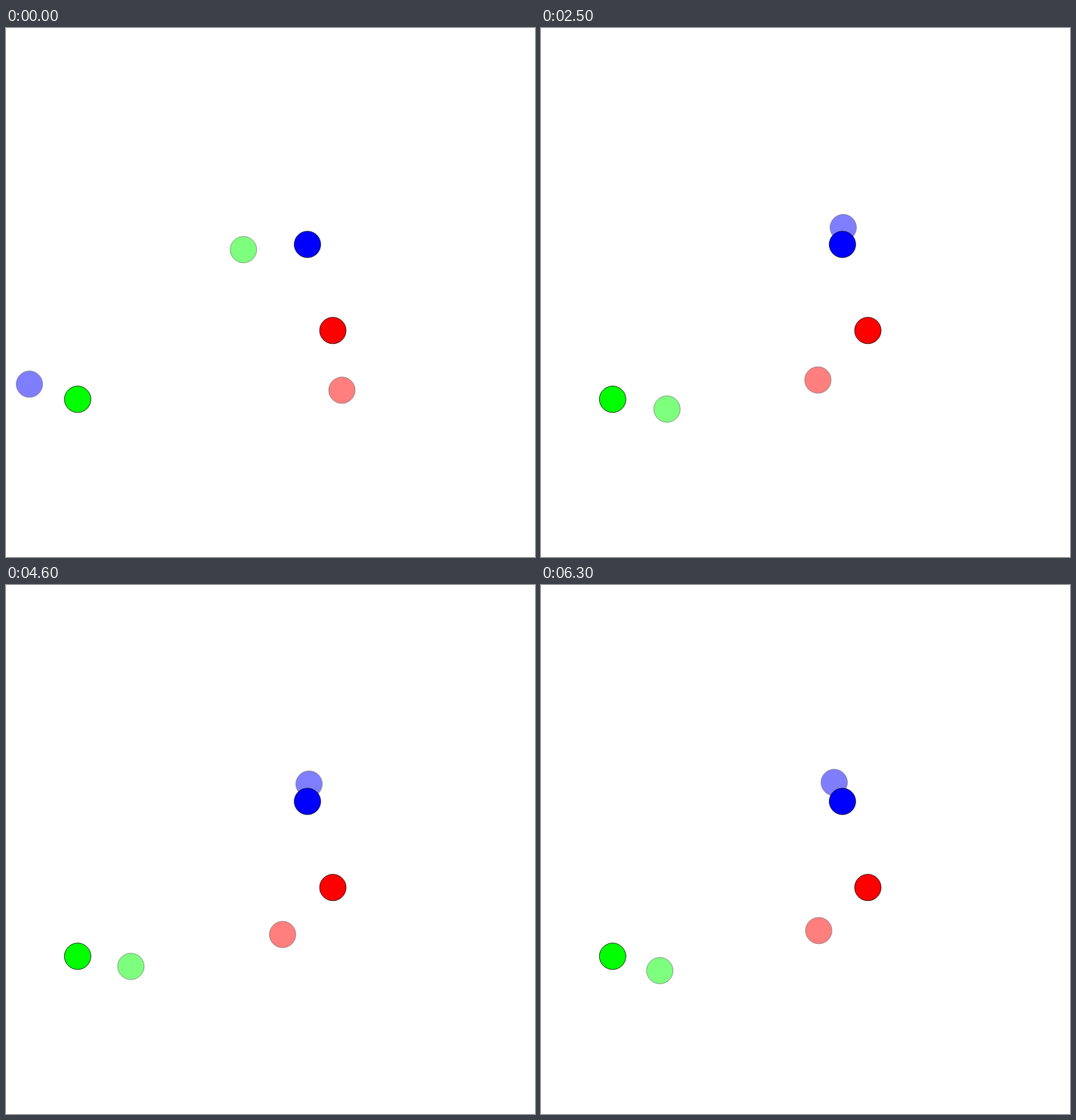
Write an HTML page that moves like this. It is 700 by 700 pixels and loops after 6.4 s.

```html
<!DOCTYPE html>
<html lang="en">
<head>
<meta charset="utf-8">
<title>Converging estimates</title>
<style>
  html, body { margin: 0; width: 100%; height: 100%; overflow: hidden; background: #fff; }
  svg { display: block; width: 100vw; height: 100vh; }
  circle { stroke: #000; stroke-opacity: .7; stroke-width: 1; }
  .estimate { opacity: .5; }
</style>
</head>
<body>
<svg viewBox="0 0 700 700"></svg>
<script>
const STEP = 100, STEPS = 64, RADIUS = 17.5;
const svg = document.querySelector("svg");

// Decaying offset whose size sways between 1 and 1 - 2 * sway of its envelope.
const settle = (start, decay, sway, speed) => step =>
  start * Math.exp(-decay * step) * (1 - sway + sway * Math.cos(speed * step));

// Each estimate settles into a triangle of three poses, visited in turn.
const points = [
  { color: "#f00", fixed: [432.5, 400.3],
    poses: [[367.5, 457.3], [366, 462.5], [382.5, 448.7]],
    dx: settle(77, .24, -1.15, .19), dy: settle(22, .24, -29.8, .12) },
  { color: "#0f0", fixed: [94.8, 491.3],
    poses: [[157.2, 510.3], [165.3, 504.7], [169, 520.1]],
    dx: settle(157, .24, -2.7, .19), dy: settle(-217, .24, 1, .225) },
  { color: "#00f", fixed: [398.9, 286.4],
    poses: [[388, 261.3], [401, 263.4], [392.7, 254.5]],
    dx: settle(-357, .24, -.22, .19), dy: settle(210, .2, .35, .42) }
];

function addCircle(color, [x, y], className) {
  const circle = document.createElementNS("http://www.w3.org/2000/svg", "circle");
  const attributes = { fill: color, r: RADIUS, cx: x, cy: y, class: className };
  for (const name in attributes) circle.setAttribute(name, attributes[name]);
  return svg.appendChild(circle);
}

for (const p of points) p.estimate = addCircle(p.color, p.poses[0], "estimate");
for (const p of points) addCircle(p.color, p.fixed, "fixed");

function draw() {
  const step = Math.floor(performance.now() / STEP) % STEPS;
  for (const p of points) {
    const [x, y] = p.poses[step % p.poses.length];
    p.estimate.setAttribute("cx", x + p.dx(step));
    p.estimate.setAttribute("cy", y + p.dy(step));
  }
  requestAnimationFrame(draw);
}
draw();
</script>
</body>
</html>
```
